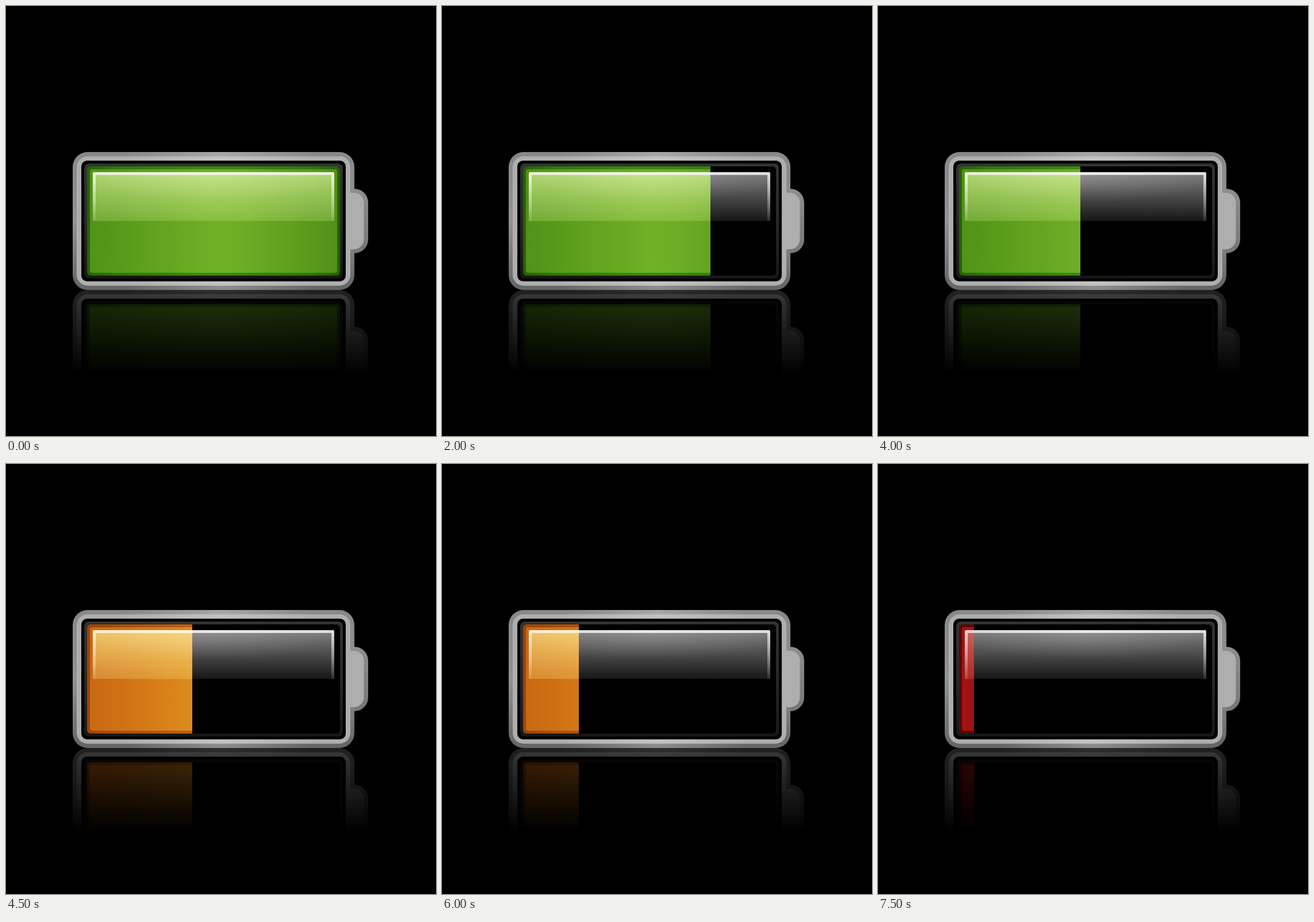
An HTML page that plays this animation: 748x748 px, repeating every 8000 ms.

```html
<!DOCTYPE html>
<html lang="en">
<head>
<meta charset="utf-8">
<title>Draining battery</title>
<style>
  html, body { margin: 0; width: 100%; height: 100%; overflow: hidden; background: #000; }
  svg { display: block; width: 100vw; height: 100vh; }

  .level, .charge { animation: 8s step-end infinite; }
  .level { animation-name: drain; }
  .high { animation-name: high; }
  .mid { animation-name: mid; }
  .low { animation-name: low; }

  /* fourteen equal steps, then a short last one */
  @keyframes drain {
    0% { transform: translateX(0); animation-timing-function: steps(14, end); }
    87.5% { transform: translateX(-401.33px); }
    93.75%, 100% { transform: translateX(-414px); }
  }
  @keyframes high { 0% { opacity: 1; } 56.25%, 100% { opacity: 0; } }
  @keyframes mid { 0% { opacity: 0; } 56.25% { opacity: 1; } 81.25%, 100% { opacity: 0; } }
  @keyframes low { 0% { opacity: 0; } 81.25%, 100% { opacity: 1; } }
</style>
</head>
<body>
<svg viewBox="0 0 748 748">
  <defs>
    <linearGradient id="rim" x2="0" y2="1">
      <stop stop-color="#888"/>
      <stop offset=".5" stop-color="#949292"/>
      <stop offset="1" stop-color="#646464"/>
    </linearGradient>
    <linearGradient id="shine">
      <stop offset=".15" stop-color="#fff" stop-opacity="0"/>
      <stop offset=".53" stop-color="#fff" stop-opacity=".26"/>
      <stop offset=".9" stop-color="#fff" stop-opacity="0"/>
    </linearGradient>
    <linearGradient id="well" x2="0" y2="1">
      <stop stop-color="#313432"/>
      <stop offset=".5" stop-color="#272827"/>
      <stop offset="1" stop-color="#171717"/>
    </linearGradient>
    <linearGradient id="tab" x2="0" y2="1">
      <stop stop-color="#8e8e8e"/>
      <stop offset="1" stop-color="#767676"/>
    </linearGradient>

    <linearGradient id="green">
      <stop stop-color="#529218"/>
      <stop offset=".1" stop-color="#57981a"/>
      <stop offset=".5" stop-color="#70b026"/>
      <stop offset=".62" stop-color="#6dac24"/>
      <stop offset="1" stop-color="#529218"/>
    </linearGradient>
    <linearGradient id="greenEdge">
      <stop stop-color="#266008"/>
      <stop offset=".12" stop-color="#2f7808"/>
      <stop offset=".5" stop-color="#3a8c0b"/>
      <stop offset=".88" stop-color="#2f7808"/>
      <stop offset="1" stop-color="#266008"/>
    </linearGradient>
    <linearGradient id="orange">
      <stop stop-color="#ca6813"/>
      <stop offset=".1" stop-color="#cf6e14"/>
      <stop offset=".5" stop-color="#e0921f"/>
      <stop offset="1" stop-color="#ca6813"/>
    </linearGradient>
    <linearGradient id="orangeEdge">
      <stop stop-color="#9c4407"/>
      <stop offset=".5" stop-color="#c46410"/>
      <stop offset="1" stop-color="#9c4407"/>
    </linearGradient>

    <linearGradient id="gloss" x2="0" y2="1">
      <stop stop-color="#fff" stop-opacity=".49"/>
      <stop offset="1" stop-color="#fff" stop-opacity=".09"/>
    </linearGradient>
    <linearGradient id="greenGloss" x2="0" y2="1">
      <stop stop-color="#d8f096" stop-opacity=".7"/>
      <stop offset="1" stop-color="#d8f096" stop-opacity=".24"/>
    </linearGradient>
    <linearGradient id="orangeGloss" x2="0" y2="1">
      <stop stop-color="#ffec8c" stop-opacity=".7"/>
      <stop offset="1" stop-color="#ffec8c" stop-opacity=".24"/>
    </linearGradient>
    <linearGradient id="redGloss" x2="0" y2="1">
      <stop stop-color="#e18282" stop-opacity=".65"/>
      <stop offset="1" stop-color="#e18282" stop-opacity=".22"/>
    </linearGradient>
    <radialGradient id="glow" cy="0" r=".6">
      <stop stop-color="#fff" stop-opacity=".18"/>
      <stop offset="1" stop-color="#fff" stop-opacity="0"/>
    </radialGradient>
    <linearGradient id="glossTop">
      <stop stop-color="#fff" stop-opacity=".7"/>
      <stop offset=".5" stop-color="#fff" stop-opacity=".83"/>
      <stop offset="1" stop-color="#fff" stop-opacity=".75"/>
    </linearGradient>
    <linearGradient id="glossSide" x2="0" y2="1">
      <stop stop-color="#fff" stop-opacity=".72"/>
      <stop offset="1" stop-color="#fff" stop-opacity=".1"/>
    </linearGradient>
    <linearGradient id="fade" x2="0" y2="1">
      <stop stop-opacity=".67"/>
      <stop offset=".57" stop-opacity="1"/>
    </linearGradient>

    <clipPath id="left"><rect class="level" x="141" y="279" width="440" height="469"/></clipPath>

    <rect id="edge" x="141" y="279" width="440" height="190" rx="6"/>
    <rect id="fill" x="146" y="284" width="430" height="180" rx="4"/>
    <rect id="pane" x="151" y="289" width="420" height="85" rx="2"/>

    <g id="frame">
      <rect x="570" y="318" width="60" height="112" rx="24" fill="url(#tab)"/>
      <rect x="116" y="254" width="490" height="240" rx="26" fill="url(#rim)"/>
      <rect x="142" y="254" width="438" height="240" fill="url(#shine)"/>
      <rect x="570" y="325" width="52.5" height="98" rx="17" fill="#aeaeae"/>
      <rect x="123" y="261.5" width="476" height="225" rx="19" fill="#aeaeae"/>
      <rect x="142" y="261.5" width="438" height="225" fill="url(#shine)"/>
      <rect x="131" y="269" width="460" height="210" rx="10"/>
      <rect x="136" y="274" width="450" height="200" rx="8" fill="url(#well)"/>
      <use href="#edge"/>
    </g>
    <g id="greenCharge">
      <use href="#edge" fill="url(#greenEdge)"/>
      <use href="#fill" fill="url(#green)"/>
      <use href="#pane" fill="url(#greenGloss)"/>
    </g>
    <g id="orangeCharge">
      <use href="#edge" fill="url(#orangeEdge)"/>
      <use href="#fill" fill="url(#orange)"/>
      <use href="#pane" fill="url(#orangeGloss)"/>
    </g>
    <g id="redCharge">
      <use href="#edge" fill="#600606"/>
      <use href="#fill" fill="#9e1414"/>
      <use href="#pane" fill="url(#redGloss)"/>
    </g>
  </defs>

  <rect width="748" height="748"/>
  <use href="#frame" transform="translate(0 988) scale(1 -1)"/>
  <use href="#frame"/>
  <use href="#pane" fill="url(#gloss)"/>

  <!-- each charge with its mirror image, cut at the current level -->
  <g clip-path="url(#left)">
    <g class="charge high">
      <use href="#greenCharge"/>
      <use href="#greenCharge" transform="translate(0 988) scale(1 -1)"/>
    </g>
    <g class="charge mid">
      <use href="#orangeCharge"/>
      <use href="#orangeCharge" transform="translate(0 988) scale(1 -1)"/>
    </g>
    <g class="charge low">
      <use href="#redCharge"/>
      <use href="#redCharge" transform="translate(0 988) scale(1 -1)"/>
    </g>
  </g>

  <rect x="156" y="294" width="410" height="80" fill="url(#glow)"/>
  <path d="M151 294v-2q0-3 3-3h414q3 0 3 3v2z" fill="url(#glossTop)"/>
  <path d="M151 294h5v80h-5zM566 294h5v80h-5z" fill="url(#glossSide)"/>
  <rect y="494" width="748" height="254" fill="url(#fade)"/>
</svg>
</body>
</html>
```
